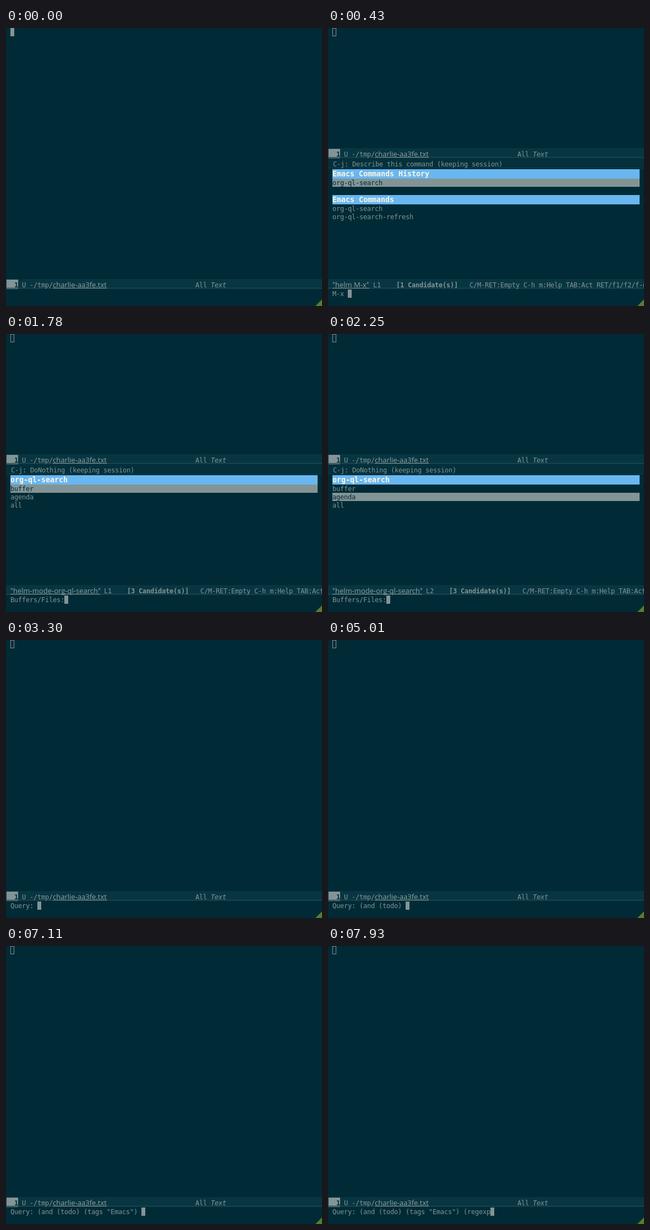
Animation of 574 by 506 pixels, one loop 8 s. Source, as an HTML page:

```html
<!DOCTYPE html>
<html lang="en">
<head>
<meta charset="utf-8">
<title>org-ql-search</title>
<style>
  html, body { margin: 0; width: 100%; height: 100%; overflow: hidden; background: #002b36; }
  svg { display: block; width: 574px; height: 506px; }
  text {
    font: 12px "DejaVu Sans Mono", monospace;
    letter-spacing: calc(7px - 1ch);
    white-space: pre;
    fill: #839496;
  }
  .b { font-weight: bold; }
  .i { font-style: italic; }
  .dark { fill: #002b36; }
  .match { font-weight: bold; fill: #93a1a1; }
  .head { font-size: 13.33px; font-weight: bold; letter-spacing: calc(8px - 1ch); fill: #fdf6e3; }
  .name { font: 13px "Open Sans", sans-serif; letter-spacing: 0; fill: #93a1a1; }
  .star { font-size: 9px; }
</style>
</head>
<body>
<svg id="stage" viewBox="0 0 574 506"></svg>
<script>
const LOOP = 8000, CELL = 7, LEFT = 8;
const BG = '#002b36', BAR = '#073642', RULE = '#284b54', GREY = '#839496', LIGHT = '#93a1a1', BLUE = '#69b7f0';
const stage = document.getElementById('stage');

const rect = (x, y, w, h, fill) => `<rect x="${x}" y="${y}" width="${w}" height="${h}" fill="${fill}"/>`;
const text = (x, y, s, cls = '') => `<text x="${x}" y="${y}" class="${cls}">${s}</text>`;

const bar = y => rect(0, y, 574, 18, BAR) + rect(0, y + 16, 574, 1, RULE);

const fileBar = y => bar(y)
  + rect(1, y + 1, 21, 17, GREY) + rect(1, y + 16, 21, 1, BG)
  + text(15, y + 15, '1', 'b dark')
  + text(29, y + 15, 'U -/tmp/')
  + text(85, y + 15, 'charlie-aa3fe.txt', 'name') + rect(85, y + 16, 98, 1, LIGHT)
  + text(344, y + 15, 'All') + text(372, y + 15, 'Text', 'i');

const STAR = '<tspan class="star" dy="-3">*</tspan>';

function helmBar(name, width, line, count) {
  const y = 457, end = LEFT + width;
  return bar(y)
    + text(LEFT, y + 15, `${STAR}<tspan dy="3">${name}</tspan>${STAR}`, 'name')
    + rect(LEFT, y + 16, width, 1, LIGHT)
    + text(end + 7, y + 15, 'L' + line)
    + text(end + 49, y + 15, `[${count} Candidate(s)]`, 'b')
    + text(end + 182, y + 15, 'C/M-RET:Empty C-h m:Help TAB:Act RET/f1/f2/f-n:NthAct');
}

const hint = s => rect(0, 237, 574, 19, '#03303b') + rect(0, 254, 574, 1, '#0d3a45') + text(9, 252, 'C-j: ' + s + ' (keeping session)');
const heading = (y, s) => rect(LEFT, y, 558, 17, BLUE) + text(LEFT, y + 13, s, 'head');

function row(y, s, selected, matched = 0) {
  const back = selected ? rect(LEFT, y, 558, 15, GREY)
    : matched ? rect(LEFT, y, matched * CELL, 15, BAR) : '';
  const cls = selected ? 'b dark' : 'match';
  const body = matched ? `<tspan class="${cls}">${s.slice(0, matched)}</tspan>${s.slice(matched)}` : s;
  return back + text(LEFT, y + 12, body, selected ? 'dark' : '');
}

const plain = () => fileBar(457);

const commands = n => fileBar(219) + hint('Describe this command')
  + heading(257, 'Emacs Commands History') + row(274, 'org-ql-search', true, n)
  + heading(304, 'Emacs Commands')
  + row(321, 'org-ql-search', false, n) + row(336, 'org-ql-search-refresh', false, n)
  + helmBar('helm M-x', 67, 1, 1);

const scopes = pick => fileBar(219) + hint('DoNothing') + heading(257, 'org-ql-search')
  + ['buffer', 'agenda', 'all'].map((s, i) => row(274 + 15 * i, s, i === pick)).join('')
  + helmBar('helm-mode-org-ql-search', 163, pick + 1, 3);

// Each step: start time, view, its argument, minibuffer text (null = idle).
const steps = [
  [0, plain, 0, null],
  [200, plain, 0, 'M-x '],
];
[0, 1, 3, 5, 8, 11].forEach((n, i) =>
  steps.push([340 + 138 * i, commands, n, 'M-x ' + 'org-ql-sear'.slice(0, n)]));
steps.push(
  [1780, scopes, 0, 'Buffers/Files:'],
  [2250, scopes, 1, 'Buffers/Files:'],
  [3300, plain, 0, 'Query: ']
);

// Typing bursts: first key, last key, number of keys.
const query = '(and (todo) (tags "Emacs") (regexp';
let typed = 0;
for (const [from, to, keys] of [
  [3550, 4270, 7], [4370, 5010, 5], [5280, 6160, 9],
  [6260, 6300, 2], [6480, 7520, 7], [7560, 7930, 4]
]) {
  for (let k = 0; k < keys; k++) {
    steps.push([from + (to - from) * k / (keys - 1), plain, 0, 'Query: ' + query.slice(0, ++typed)]);
  }
}

function draw([, view, arg, mini]) {
  const cursor = mini === null
    ? rect(LEFT, 0, 7, 15, GREY)
    : `<rect x="8.5" y=".5" width="6" height="14" fill="none" stroke="${GREY}"/>`
      + text(LEFT, 488, mini) + rect(LEFT + mini.length * CELL, 476, 7, 15, GREY);
  stage.innerHTML = rect(0, 0, 574, 506, BG) + view(arg) + cursor
    + '<path d="M562 506L574 494V506Z" fill="#5b7b2c"/>';
}

let shown = null;
const start = performance.now();

function tick() {
  const t = (performance.now() - start) % LOOP;
  const step = steps.findLast(s => s[0] <= t + 0.5);
  if (step !== shown) draw(shown = step);
  requestAnimationFrame(tick);
}
tick();
</script>
</body>
</html>
```
